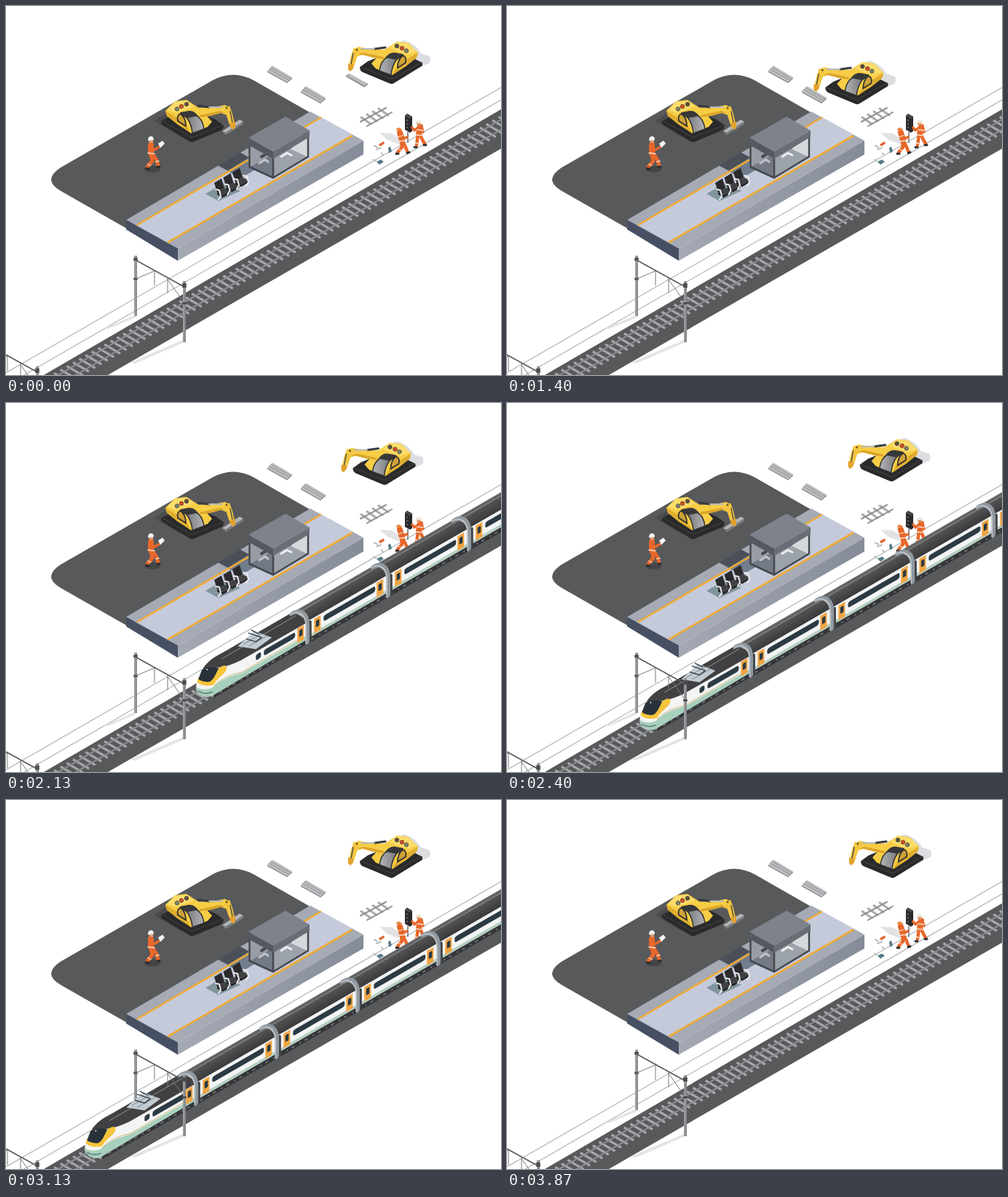
Animation, 680 px wide and 507 px high, one loop 4.07 s. Source, as an HTML page:

```html
<!DOCTYPE html>
<html lang="en">
<head>
<meta charset="utf-8">
<title>Station works</title>
<style>
  html, body { margin: 0; width: 100%; height: 100%; overflow: hidden; background: #fff; }
  svg { display: block; width: 100vw; height: 100vh; }
  .line { fill: none; stroke-linecap: round; stroke-linejoin: round; }
  .suit { stroke: #e8672a; }
  .band { stroke: #f6e3cf; stroke-width: 1.3; }
  .shoe { stroke: #2c2c2e; stroke-width: 3; }
</style>
</head>
<body>
<svg viewBox="0 0 680 507" preserveAspectRatio="none">
  <defs>
    <linearGradient id="roofFill" x2="0" y2="1">
      <stop offset="0" stop-color="#6b6b6d"/><stop offset=".3" stop-color="#515152"/><stop offset="1" stop-color="#39393b"/>
    </linearGradient>
    <linearGradient id="glass" x2="1">
      <stop offset="0" stop-color="#b3b4b6"/><stop offset="1" stop-color="#77797c"/>
    </linearGradient>
    <linearGradient id="wall" x2="1">
      <stop offset="0" stop-color="#a4a9b4"/><stop offset="1" stop-color="#858b98"/>
    </linearGradient>

    <g id="digger">
      <path fill="#2a2a2b" d="M486 84 L497 76 L536 60 L572 78 V82 L533 106 Q530 108 526 106 L490 91 Q486 89 486 84Z"/>
      <path class="line" stroke="#454547" d="M488 84 L528 100 Q530 101 533 99 L570 78"/>
      <path fill="#f6cd45" d="M502 79 L517 62 L537 49 L553 51 L566 64 L564 71 L549 83 L530 95 L508 86Z"/>
      <path fill="#dfad2d" d="M566 64 L564 71 L531 95 L538 81Z"/>
      <path fill="#fbdd6b" d="M527 58 L537 50 L553 52 L564 63 L551 67Z"/>
      <path fill="#f6cd45" d="M477 60 L484 56 L500 59 L524 60 L520 73 L505 71 L490 67 L481 70Z"/>
      <path fill="#dca62b" d="M483 67 L491 64 L519 70 L519 73 L505 71 L490 67Z"/>
      <path class="line" stroke="#3b3c3f" stroke-width="3" d="M506 59 L521 57"/>
      <path class="line" stroke="#b7b9bc" stroke-width="2" d="M488 59 L506 59"/>
      <path fill="#f3c53f" d="M478 57 L485 62 L478 83 L471 82 L474 68Z"/>
      <path class="line" stroke="#4a4a4c" stroke-width="1.4" d="M477 65 L474 80"/>
      <path fill="#e2a22e" d="M470 79 L478 81 L477 86 L473 90 L470 87Z"/>
      <circle cx="482" cy="60" r="1.5" fill="#6e5520"/>
      <path fill="url(#glass)" stroke="#303133" stroke-width="1.5" d="M513 89 Q515 75 524 70 L537 73 Q530 82 529 95Z"/>
      <path fill="#37383a" d="M521 71 Q527 63 534 64 L545 66 Q548 68 544 70 L537 74Z"/>
      <path fill="#cfa239" stroke="#2c2d2f" stroke-width="1.7" d="M538 85 Q538 74 545 68 Q551 70 549 78Z"/>
      <g stroke="#4c4028" stroke-width=".7">
        <circle cx="537" cy="55" r="2.8" fill="#5a5148"/><circle cx="544" cy="58" r="2.8" fill="#dc4a2c"/><circle cx="550" cy="61.5" r="2.8" fill="#7a8270"/>
      </g>
    </g>

    <g id="stack">
      <path fill="#8e9093" d="M359 89 L386 104 L393 98 V100 L386 106 L359 91Z"/>
      <path fill="#bcbdbf" d="M359 89 L366 82 L393 98 L386 104Z"/>
      <path class="line" stroke="#8f9194" d="M361.300 86.700 L388.300 102 M363.700 84.300 L390.700 100"/>
    </g>

    <g id="backPole">
      <path fill="#e3e4e5" d="M178 424 L135 443 L140 444 L178 428Z"/>
      <path stroke="#8b8d90" stroke-width="4" d="M178 343 V426"/>
      <path stroke="#aeb0b2" d="M177 343 V426"/>
      <path stroke="#4c4d50" stroke-width="5.500" d="M178 346 v4 M178 373.500 v3"/>
    </g>
    <g id="frontPole">
      <g class="line" stroke="#77797c">
        <path stroke="#5b5d60" stroke-width="1.7" d="M178 349 L245 386"/>
        <path d="M178 375 L204 364 V384 M222 374 V394 M222 376 L245 408"/>
      </g>
      <path stroke="#85878a" stroke-width="4" d="M245 378 V462"/>
      <path stroke="#acaeb0" d="M244 378 V462"/>
      <path stroke="#4c4d50" stroke-width="5.500" d="M245 381 v6 M245 407 v3"/>
    </g>

    <g id="door">
      <rect y="28" width="9" height="20" fill="#f0a441"/>
      <rect x="2.500" y="32" width="4.500" height="9" rx="1" fill="#2b3942"/>
    </g>
    <g id="hoop" class="line">
      <path stroke="#3e4246" stroke-width="7" d="M2 30 V54"/>
      <path stroke="#8f979f" stroke-width="5.500" d="M-22 3 C-10 3 0 16 0 32 V55"/>
      <path stroke="#c0c6cb" stroke-width="1.500" d="M-23 3 C-12 3 -2 16 -2 32 V55"/>
    </g>
    <g id="car">
      <path fill="url(#roofFill)" d="M-22 2 H89 Q102 5 111 27 H0 Q-9 5 -22 2Z"/>
      <path stroke="#98999b" d="M-14 7 H97"/>
      <rect y="26" width="111" height="24" fill="#f3f4f4"/>
      <rect y="46" width="111" height="4" fill="#b5cfc0"/>
      <rect x="22" y="31" width="71" height="8" rx="3" fill="#2b3a43"/>
      <use href="#door" x="9"/><use href="#door" x="95"/>
    </g>
    <g id="pantograph">
      <path fill="#c2cbd1" d="M57 -28 L80 -49 L104 -40 L82 -24Z"/>
      <path class="line" stroke="#7d878e" d="M65 -31 L90 -45 M72 -28 L97 -42"/>
      <path class="line" stroke="#3b4248" stroke-width="1.500" d="M69 -38 L82 -34 L90 -40 L72 -46 M76 -50 L86 -45"/>
    </g>
  </defs>

  <!-- yard and platform -->
  <path fill="#58595b" d="M168 307 L75 254 Q49 239 75 222 L284 102 Q312 87 340 102 L424 150Z"/>
  <path fill="#a5aab5" d="M165 294 L418 145 L491 185 L236 333Z"/>
  <path fill="#c5cadb" d="M180 301 L433 153 L476 177 L222 325Z"/>
  <path fill="#465062" d="M165 294 L236 333 V350 L165 307Z"/>
  <path fill="url(#wall)" d="M236 333 L491 185 V204 L236 350Z"/>
  <path fill="#717c8c" d="M291 219 L321 201 L352 219 L322 237Z"/>
  <path fill="#4b5058" d="M291 219 L321 201 L334 208 L305 226Z"/>
  <path stroke="#f0ab32" stroke-width="2.600" d="M180 301 L433 153 M222 325 L476 178"/>

  <!-- bench -->
  <path fill="#80959c" d="M274 258 L300 243 L322 254 L292 268Z"/>
  <g id="bench"></g>

  <!-- shelter -->
  <path fill="#7c838e" d="M334 222 L384 193 L416 208 L367 237Z"/>
  <path fill="#b5b8be" d="M334 186 L384 168 V193 L334 222Z"/>
  <path fill="#d0d2d6" d="M384 168 L416 180 V208 L384 193Z"/>
  <path class="line" stroke="#f2f2f3" stroke-width="3" d="M348 216 l8 -5 l4 3 M378 207 l8 -5 l6 3"/>
  <path class="line" stroke="#38393c" stroke-width="4" d="M351 207 l5 -3 M381 199 l10 -5"/>
  <path fill="#626a76" opacity=".35" d="M334 188 L367 208 V237 L334 222Z"/>
  <path fill="#e4e6e9" opacity=".3" d="M367 208 L416 179 V208 L367 237Z"/>
  <path class="line" stroke="#44484e" stroke-width="2.500" d="M334.500 188 V221 L367 236 L415 207 V178 M367 205 V236"/>
  <path fill="#7d828b" d="M333 181 L384 152 L417 171 L367 200Z"/>
  <path fill="#545961" d="M333 181 L367 200 V210 L333 191Z"/>
  <path fill="#686d76" d="M367 200 L417 171 V180 L367 210Z"/>

  <!-- first digger -->
  <path fill="#4a4b4d" d="M203 158 L222 146 L262 168 L240 180Z"/>
  <path fill="#85878a" d="M297 172 L302 175 L326 160 V162 L302 177Z"/>
  <path fill="#b3b4b6" d="M297 172 L321 156 L326 159 L302 174Z"/>
  <use href="#digger" transform="translate(785 80) scale(-1 1)"/>

  <!-- surveyor -->
  <ellipse cx="201" cy="224" rx="11" ry="4.500" fill="#444547"/>
  <g class="line">
    <path class="suit" stroke-width="5" d="M199 204 L201 213 L194 221 M202 204 L207 212 L209 219"/>
    <path class="shoe" d="M193 223 l3 1 M208 221 l3 0"/>
    <path class="suit" stroke-width="8" d="M199 191 V202"/>
    <path class="suit" stroke-width="3.500" d="M197 191 L203 198 L210 194"/>
    <path class="band" d="M195 202 l9 1 M195 217 l4 2 M206 214 l4 -1"/>
  </g>
  <path fill="#e0a078" d="M196 184 h6 v4 h-5z"/>
  <path fill="#f5f5f5" d="M195 185 Q195 179 199 179 Q203 179 203 184Z"/>
  <path fill="#f5f5f5" d="M209 189 L215 185 L218 189 L212 195Z"/>

  <!-- materials -->
  <use href="#stack"/><use href="#stack" x="46" y="28"/>
  <g class="line">
    <path stroke="#a9abae" stroke-width="3" d="M488 153 l13 9 M496 149 l13 9 M504 145 l13 9 M512 141 l13 9"/>
    <path stroke="#8d9093" stroke-width="2" d="M487 159 L522 140 M496 165 L530 146"/>
  </g>

  <!-- track bed -->
  <path fill="#58595b" d="M680 142 L52 507 H140 L680 196Z"/>
  <path id="sleepers" stroke="#a5a7aa" stroke-width="3.200"/>
  <g id="rails" stroke="#8c8e91" stroke-width="2"></g>
  <path stroke="#b1b3b5" stroke-width="1.200" d="M680 112 L0 504 M680 129 L18 511"/>

  <!-- signal crew -->
  <path fill="#e1e2e4" d="M513 174 L530 175 L546 186 L540 190 L524 184Z"/>
  <path fill="#2a2a2c" d="M548 151 L551 148 L558 152 V172 L555 174 L548 170Z"/>
  <path fill="#48494c" d="M548 151 L551 148 L558 152 L555 155Z"/>
  <g fill="#5c5d60"><circle cx="551" cy="157" r="1.300"/><circle cx="551" cy="162" r="1.300"/><circle cx="551" cy="167" r="1.300"/></g>
  <path stroke="#8d8f92" stroke-width="2" d="M552 173 V188"/>
  <g class="line">
    <path class="suit" stroke-width="4.500" d="M543 186 L544 194 L538 201 M545 186 L549 194 L551 199"/>
    <path class="shoe" d="M536 203 l3 0 M551 202 l3 -1"/>
    <path class="suit" stroke-width="8" d="M541 174 L544 184"/>
    <path class="suit" stroke-width="3.500" d="M541 174 L547 182 L551 180"/>
    <path class="band" d="M540 186 l8 -1 M538 180 l7 -2 M540 197 l4 2"/>
    <path class="suit" stroke-width="4.500" d="M566 177 L564 191 M569 177 L572 184 L575 189"/>
    <path class="shoe" d="M561 194 l3 0 M574 191 l3 0"/>
    <path class="suit" stroke-width="8" d="M569 166 L567 176"/>
    <path class="suit" stroke-width="3.500" d="M567 166 L561 171 L558 167 M571 166 L573 173"/>
    <path class="band" d="M563 177 l8 1 M565 170 l8 1 M562 188 l4 1"/>
  </g>
  <path fill="#e9883d" d="M536 171 Q536 167 540 167 L545 170Z"/>
  <path fill="#f0e4da" d="M563 162 Q562 157 567 157 Q571 157 571 161Z"/>
  <path fill="#d99569" d="M564 161 h5 v3 h-4z"/>
  <path fill="#dd6430" d="M512 190 L519 186 L520 189 L514 193Z"/>
  <path class="line" stroke="#b9bbbd" stroke-width="2" d="M506 192 l4 2 M509 197 l6 -2 M516 202 l2 3 M505 211 l3 2"/>
  <path fill="#557a88" d="M525 195 L528 193 L530 200 L526 202Z M509 214 L515 211 L519 214 L513 218Z"/>

  <!-- second digger -->
  <g id="plank">
    <path fill="#85878a" d="M467 95 L492 109 L497 106 V108 L492 111.500 L467 97Z"/>
    <path fill="#b9babc" d="M467 95 L471 92.500 L497 106.500 L492 109.500Z"/>
  </g>
  <g id="mover">
    <path fill="#dcdde0" d="M530 54 L547 47 Q564 53 570 65 L582 69 Q584 75 581 79 L560 87Z"/>
    <use href="#digger"/>
  </g>

  <use href="#backPole"/>

  <g id="train">
    <g transform="matrix(1 -.577 0 1 0 0)">
      <rect x="24" y="49" width="700" height="8" fill="#343538"/>
      <path stroke="#85898c" stroke-width="1.500" stroke-dasharray="4 7 2 5" d="M32 54 H716"/>
      <g id="cars"></g>
    </g>
    <g id="head">
      <path fill="#f3f4f4" d="M36 -19 C22 -13 12 -3 8 4 C2 14 0 22 0 30 C1 38 12 44 22 40 L153 -38 V-62 L131 -74Z"/>
      <path fill="#a7d0bd" d="M0 28 Q10 34 22 29 Q36 15 62 9 L153 -43 V-38 L22 40 C12 44 1 38 0 30Z"/>
      <path class="line" stroke="#d3b878" d="M24 27 Q38 12 62 8 L138 -36"/>
      <path fill="#414143" d="M9 3 C16 -8 26 -14 36 -19 L131 -74 Q144 -73 153 -61 L62 -9 Q46 -1 33 1Z"/>
      <path stroke="#929395" d="M34 -10 L137 -70"/>
      <path fill="#f7c53c" d="M30 3 Q39 -4 42 0 Q43 6 34 13 Q27 19 24 25 Q10 29 1 21 L3 15Z"/>
      <path fill="#29323a" d="M8 4 Q18 -1 31 2 L25 14 Q20 22 15 21 Q6 20 3 17Z"/>
      <path class="line" stroke="#5c7a74" stroke-width="1.500" d="M3 34 Q12 39 22 35"/>
      <circle cx="15" cy="4" r="1" fill="#e9eaea"/>
      <use href="#pantograph"/>
      <g transform="matrix(1 -.577 0 1 0 0)">
        <rect x="82" y="31" width="7" height="8" rx="2.500" fill="#2b3a43"/>
        <rect x="93" y="31" width="43" height="8" rx="3" fill="#2b3a43"/>
        <use href="#door" x="139"/>
        <use href="#hoop" x="153"/>
      </g>
    </g>
    <g transform="translate(597 -344.500)">
      <path fill="#f3f4f4" d="M-22 14 L90 -51 Q100 -55 112 -52 C130 -49 142 -42 143 -34 C142 -26 136 -23 130 -22 L0 51 V26Z"/>
      <path fill="#a7d0bd" d="M0 46 L72 4 Q96 -8 106 -20 Q124 -29 143 -33 C142 -26 136 -23 130 -22 L0 51Z"/>
      <path fill="#414143" d="M-22 14 L90 -51 Q100 -55 112 -52 Q120 -49 110 -42 Q92 -31 62 -10 L0 26 Q-9 15 -22 14Z"/>
      <path stroke="#929395" d="M-14 15 L92 -46"/>
      <path fill="#f7c53c" d="M108 -46 Q116 -51 128 -48 Q141 -43 141 -38 Q130 -34 118 -36 Q110 -40 108 -46Z"/>
      <use href="#pantograph" x="-35" y="21"/>
      <g transform="matrix(1 -.577 0 1 0 0)">
        <use href="#door" x="9"/>
        <rect x="21" y="31" width="42" height="8" rx="3" fill="#2b3a43"/>
        <rect x="66" y="31" width="8" height="8" rx="3" fill="#2b3a43"/>
        <use href="#hoop"/>
      </g>
    </g>
  </g>

  <path fill="#e3e4e5" d="M245 458 L170 490 L178 491 L245 462Z"/>
  <use href="#frontPole"/>
  <use href="#frontPole" x="-202" y="117"/>
</svg>

<script>
  const LOOP = 4070, STEP = 66.7, SLOPE = 0.577;
  const $ = id => document.getElementById(id);
  const repeat = (n, fn) => Array.from({ length: n }, (_, i) => fn(i)).join('');
  const trackY = x => 414 - SLOPE * (x - 245);

  $('sleepers').setAttribute('d', repeat(75, i => {
    const x = 60 + i * 8.6;
    return `M${x - 11} ${trackY(x) - 6.3}l22 12.7`;
  }));
  $('rails').innerHTML = [-6, 6].map(o =>
    `<path d="M${50 + o} ${trackY(50) + o * SLOPE}L${700 + o} ${trackY(700) + o * SLOPE}"/>`).join('');
  $('cars').innerHTML =
    repeat(4, i => `<use href="#car" x="${153 + i * 111}"/>`) +
    repeat(3, i => `<use href="#hoop" x="${264 + i * 111}"/>`);

  const arm = '<path class="line" stroke="#eceded" stroke-width="2" d="M288 252l5 1l2 8l-3 5"/>';
  $('bench').innerHTML = repeat(3, i => `<g transform="translate(${i * 12.5} ${i * -7.2})">
    <path fill="#2b2b2d" d="M286 243l10 -6l4 13l-10 6z"/>
    <path fill="#414144" d="M290 256l10 -6l8 4l-10 6z"/>
    <path fill="#222224" d="M290 256l8 4l10 -6v3l-10 6l-8 -4z"/>${arm}</g>`) +
    `<g transform="translate(38 -19)">${arm}</g>`;

  const progress = (t, from, to) => Math.min(1, Math.max(0, (t - from) / (to - from)));
  const easeInOut = p => p < 0.5 ? 2 * p * p : 1 - 2 * (1 - p) ** 2;

  // Horizontal position of the train's nose: brake, wait, accelerate away.
  function noseX(t) {
    if (t < 2431) return 182 + 82 * ((2431 - t) / 301) ** 2.3;
    return 182 - 4.5 * (Math.max(0, t - 2865) / STEP) ** 2;
  }

  const move = (el, x, y) => el.setAttribute('transform', `translate(${x.toFixed(2)} ${y.toFixed(2)})`);

  function draw(t) {
    const drive = 52 * (easeInOut(progress(t, 530, 1130)) - easeInOut(progress(t, 1150, 2560)));
    move($('mover'), -drive, drive * SLOPE);

    const lift = progress(t, 400, 600), drop = progress(t, 1130, 1270);
    move($('plank'), -drive - 6 * lift, drive * SLOPE - 14 * lift + 4 * drop);
    $('plank').style.display = t < 1200 ? '' : 'none';

    const x = noseX(t);
    move($('train'), x, 360 + SLOPE * (265 - x));
  }

  // The motion is sampled at fifteen pictures a second.
  const start = performance.now();
  function tick() {
    const t = (performance.now() - start) % LOOP;
    draw(Math.floor((t + 6) / 66.6) * STEP);
    requestAnimationFrame(tick);
  }
  tick();
</script>
</body>
</html>
```
